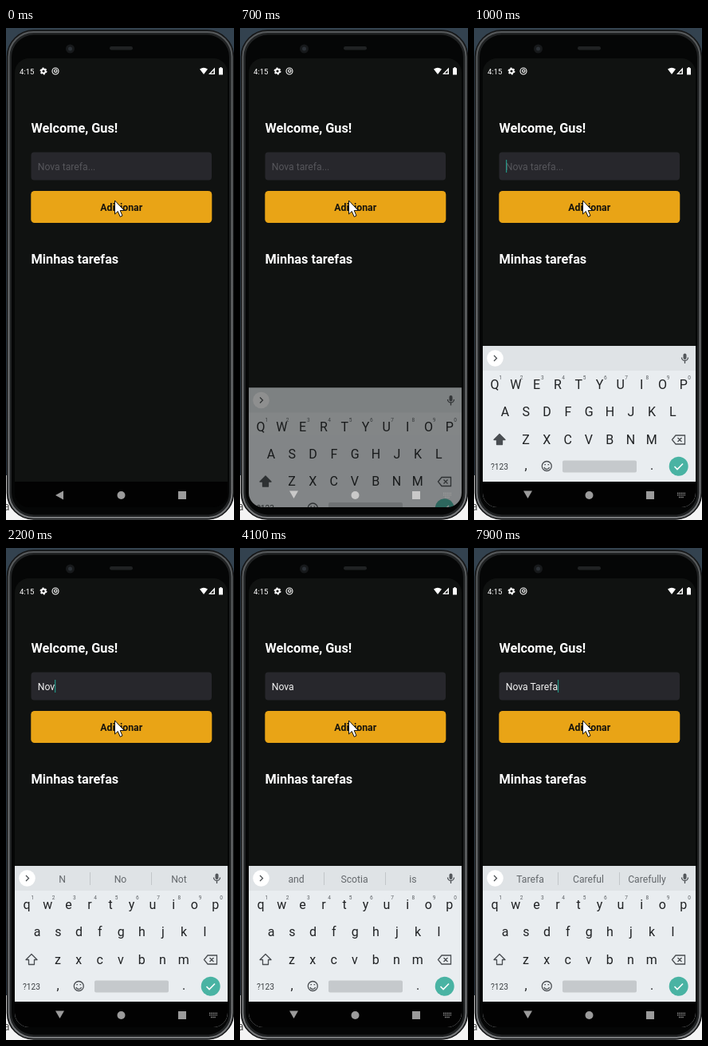
An HTML page that plays this animation: 286x616 px, repeating every 8 s.

```html
<!DOCTYPE html>
<html lang="pt">
<head>
<meta charset="utf-8">
<title>Tarefas</title>
<style>
html, body { margin: 0; height: 100%; overflow: hidden; background: #33424f; }
svg { display: block; width: 100vw; height: 100vh; font-family: Roboto, Inter, sans-serif; }
text { white-space: pre; }
.title { font-size: 16.3px; font-weight: 700; fill: #fff; }
.mid { text-anchor: middle; }
.key { font-size: 16px; fill: #202224; }
.digit { font-size: 6.5px; fill: #5c6064; }
.hint { font-size: 12.2px; fill: #64686c; }
.line { fill: none; stroke: #4a4e52; stroke-width: 1.3; }
</style>
</head>
<body>
<svg viewBox="0 0 286 616">
  <defs>
    <clipPath id="screen"><rect x="11" y="38" width="267" height="562" rx="18"/></clipPath>
    <linearGradient id="rim" x2="0" y2="1">
      <stop offset="0" stop-color="#56595b"/>
      <stop offset=".5" stop-color="#6c6e70"/>
      <stop offset="1" stop-color="#77797b"/>
    </linearGradient>
  </defs>

  <rect width="286" height="616" fill="#33424f"/>
  <rect y="560" width="286" height="56" fill="#f4f4f4"/>
  <text x="-3" y="604" font-size="14" fill="#555">a</text>

  <!-- phone body -->
  <rect x="1.500" y="3" width="284" height="612" rx="33" fill="#1d1f20" stroke="#151617" stroke-width="1.500"/>
  <rect x="3.500" y="5" width="280" height="608" rx="31" fill="#202223" stroke="url(#rim)" stroke-width="2"/>
  <rect x="7" y="8.500" width="273" height="601" rx="28" fill="#050606"/>
  <rect x="130" y="23" width="29" height="4.500" rx="2.200" fill="#202223"/>
  <circle cx="80.500" cy="26" r="5.500" fill="#17191b"/>
  <circle cx="80.500" cy="26" r="2.500" fill="#2b3036"/>

  <g clip-path="url(#screen)">
    <rect x="11" y="38" width="267" height="562" fill="#101211"/>

    <!-- status bar -->
    <text x="17" y="57.500" font-size="9.500" fill="#fff">4:15</text>
    <circle cx="47" cy="54" r="2.500" fill="none" stroke="#fff" stroke-width="1.800"/>
    <circle cx="47" cy="54" r="3.800" fill="none" stroke="#fff" stroke-width="1.400" stroke-dasharray="2 1.980"/>
    <circle cx="62" cy="54" r="4" fill="none" stroke="#fff" stroke-width="1.100"/>
    <circle cx="62.300" cy="53.700" r="1.700" fill="none" stroke="#fff" stroke-width="1.100"/>
    <path fill="#fff" d="M243 51.500Q248 48 253 51.500L248 58ZM262 49.500V58H254ZM267 50.200H268.500V49H270.500V50.200H272V58.500H267Z"/>
    <path fill="#101211" d="M260.500 53V56.800H257Z"/>

    <!-- form -->
    <text class="title" x="31.500" y="130.500">Welcome, Gus!</text>
    <rect x="31.500" y="155.500" width="226.500" height="35" rx="4" fill="#27272c"/>
    <text id="entry" x="39.700" y="178" font-size="12.200"></text>
    <rect id="caret" y="165" width="1.200" height="16" fill="#239686"/>
    <rect x="31.300" y="204" width="227" height="40" rx="4.500" fill="#e9a416"/>
    <text class="mid" x="144.700" y="229" font-size="12.250" font-weight="700" fill="#17140d">Adicionar</text>
    <text class="title" x="31.500" y="295">Minhas tarefas</text>

    <rect class="nav" x="11" y="568" width="267" height="32" fill="#020202"/>

    <g id="board">
      <rect x="11" y="398" width="267" height="220" fill="#e9edf0"/>
      <rect x="11" y="398" width="267" height="31" fill="#dfe3e6"/>
      <circle cx="26.500" cy="413.500" r="10.300" fill="#fff"/>
      <path class="line" d="M25 410L28.500 413.500L25 417"/>
      <rect x="262.500" y="407.500" width="4" height="7.500" rx="2" fill="#53575b"/>
      <path class="line" d="M260.500 412.500A4 4 0 0 0 268.500 412.500M264.500 416.500V420"/>
      <g id="hints">
        <path stroke="#c2c6c9" d="M105.500 406V422M182.500 406V422"/>
        <text class="hint mid" x="70.500" y="418.500"></text>
        <text class="hint mid" x="143.500" y="418.500"></text>
        <text class="hint mid" x="217" y="418.500"></text>
      </g>
      <g id="keys"></g>
      <path id="shift" class="line" stroke-linejoin="round" d="M32 508.500L39 515.500H35.500V521.500H28.500V515.500H25Z"/>
      <path class="line" d="M248.500 515.500L253 510H264.500V521H253ZM255.500 513L260.500 518M260.500 513L255.500 518"/>
      <text class="mid" x="32" y="552.500" font-size="10.200" fill="#3c4043">?123</text>
      <text class="key mid" x="65" y="553">,</text>
      <text class="key mid" x="223" y="553">.</text>
      <circle class="line" cx="91.300" cy="548.500" r="6"/>
      <path class="line" d="M88 550A3.500 3.500 0 0 0 94.600 550M88.400 546.700H90M92.600 546.700H94.200"/>
      <rect x="111" y="541.500" width="93" height="15" rx="2" fill="#c5c9cc"/>
      <circle cx="256.700" cy="548.800" r="12" fill="#49b3a3"/>
      <path fill="none" stroke="#fff" stroke-width="1.600" d="M251.500 549L255 552.500L262 545.500"/>
    </g>
    <rect class="nav" x="11" y="568" width="267" height="32" fill="#020202"/>

    <!-- navigation -->
    <g id="icons">
      <path id="back"/>
      <circle cx="144.500" cy="585" r="5"/>
      <rect x="216" y="580" width="10" height="10"/>
      <path id="boardIcon" fill="none" stroke="#9b9b9b" stroke-width="1.300" d="M255 582.500H265M255 584.800H265M257 587.500H263" stroke-dasharray="1.300 .900"/>
    </g>
  </g>

  <!-- pointer -->
  <path fill="#fff" stroke="#111" stroke-width="1" d="M136.500 216V233L140.300 229.500L143.200 236.300L146 235L143.200 228.500H148.300Z"/>
</svg>
<script>
const $ = id => document.getElementById(id);
const LOOP = 8000;

// [x of first key, baseline, letters]
const rows = [[26, 452, 'qwertyuiop'], [39, 486, 'asdfghjkl'], [65, 520.5, 'zxcvbnm']];
const label = (cls, x, y, s) => `<text class="${cls} mid" x="${x}" y="${y}">${s}</text>`;
$('keys').innerHTML = rows.map(([x0, y, row], r) => [...row].map((c, i) => {
  const x = x0 + i * 26.3;
  return label('key', x, y, c) + (r ? '' : label('digit', x + 7.3, 440, (i + 1) % 10));
}).join('')).join('');
const letters = [...$('keys').querySelectorAll('.key')];
const hintTexts = [...$('hints').querySelectorAll('text')];
const navBars = document.querySelectorAll('.nav');

// each list holds [start time, value]
const typed = [[0, ''], [1700, 'N'], [2100, 'No'], [2200, 'Nov'], [2300, 'Nova'], [2600, 'Nova '],
  [6600, 'Nova T'], [6800, 'Nova Ta'], [7000, 'Nova Tar'], [7200, 'Nova Tare'],
  [7400, 'Nova Taref'], [7500, 'Nova Tarefa']];
const hints = [[0, ''], [2100, 'N,No,Not'], [2400, 'Nov,Nova,November'],
  [2700, 'and,Scotia,is'], [7800, 'Tarefa,Careful,Carefully']];
// board offset and opacity
const slide = [[0, [220, 0]], [700, [52.5, .53]], [800, [2.5, .96]], [900, [.6, 1]], [1000, [0, 1]]];

const at = (list, t) => list.findLast(([start]) => start <= t)[1];

function caretOn(t) {
  if (t < 100 || (t >= 700 && t < 800)) return false;
  return t < 3100 || t >= 6600 || Math.floor((t - 3100) / 500) % 2 === 1;
}

function draw(t) {
  const text = at(typed, t), words = at(hints, t), [dy, alpha] = at(slide, t);
  const upper = t < 1700, rising = t >= 700 && t < 800, entry = $('entry');

  entry.textContent = text || 'Nova tarefa...';
  entry.setAttribute('fill', text ? '#f2f2f2' : '#56565b');
  $('caret').setAttribute('x', text ? 39.6 + entry.getComputedTextLength() : 40);
  $('caret').setAttribute('opacity', +caretOn(t));

  $('board').setAttribute('transform', `translate(0 ${dy})`);
  $('board').setAttribute('opacity', alpha);
  // the navigation bar is see-through while the board rises
  navBars.forEach(bar => bar.setAttribute('opacity', +!rising));
  $('icons').setAttribute('fill', rising ? '#c9c9c9' : '#9b9b9b');
  letters.forEach((el, i) => {
    const c = 'qwertyuiopasdfghjklzxcvbnm'[i];
    el.textContent = upper ? c.toUpperCase() : c;
  });
  $('shift').style.fill = upper ? '#4a4e52' : 'none';

  $('hints').setAttribute('opacity', words ? 1 : 0);
  const list = words.split(',');
  hintTexts.forEach((el, i) => el.textContent = list[i] || '');

  $('back').setAttribute('d', t < 400 ? 'M62 585L72 579.5V590.5Z' : 'M62 579.500H73L67.500 589Z');
  $('boardIcon').setAttribute('opacity', t < 200 ? 0 : 1);
}

const start = performance.now();
function tick() {
  draw((performance.now() - start) % LOOP);
  requestAnimationFrame(tick);
}
tick();
</script>
</body>
</html>
```
